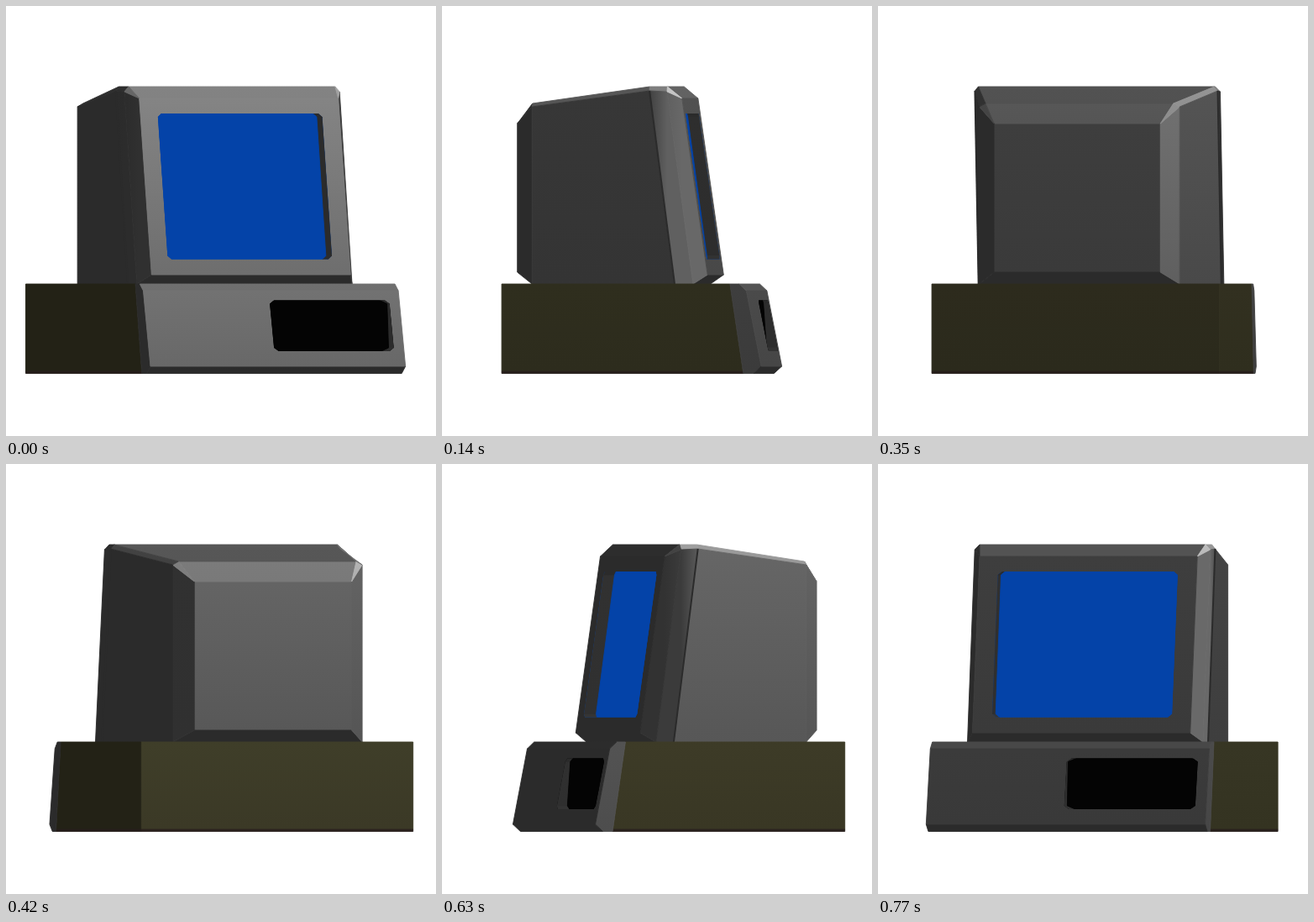
An HTML page with a canvas for the animation above (840 ms loop, 512 px wide and 512 px high).

```html
<!DOCTYPE html>
<html>
<head>
<meta charset="utf-8">
<style>
  html, body { margin: 0; width: 100%; height: 100%; overflow: hidden; background: #fff; }
  canvas { display: block; }
</style>
</head>
<body>
<canvas id="stage" width="512" height="512"></canvas>
<script>
const ctx = document.getElementById('stage').getContext('2d');
const STEP_MS = 70, STEPS = 12, STEP_ANGLE = 0.5;
const AXIS_X = 260.4, AMBIENT = 43, DIFFUSE = 85;
const LIGHT = [0.52, -0.6, 0.6];
const GRAY = [1, 1, 1], OLIVE = [0.81, 0.79, 0.52], RUST = [0.85, 0.68, 0.6];
const SIDES = [-1, 1];
let cos = 1, sin = 0;

// Model space: x right, y down (screen pixels), z out of the front.
const screenX = p => AXIS_X + p[0] * cos + p[2] * sin;
const turn = ([x, y, z]) => [x * cos + z * sin, y, z * cos - x * sin];
const sub = (a, b) => a.map((v, i) => v - b[i]);
const dot = (a, b) => a.reduce((sum, v, i) => sum + v * b[i], 0);
const mix = (a, b) => a.map((v, i) => (v + b[i]) / 2);

function normalOf(pts) {
  const [a, b, c] = sub(pts[1], pts[0]), [d, e, f] = sub(pts[2], pts[0]);
  const n = [b * f - c * e, c * d - a * f, a * e - b * d];
  const len = Math.hypot(...n);
  return n.map(v => v / len);
}

// The lamp hangs above, so surfaces dim towards the floor.
function shade(normal, tint, gain, y) {
  const lit = Math.max(0, dot(turn(normal), LIGHT)) ** 3;
  const level = AMBIENT + DIFFUSE * lit * gain * (1.7 - (y - 96) * 0.0019);
  return `rgb(${tint.map(t => Math.round(level * t))})`;
}

function trace(pts) {
  ctx.beginPath();
  pts.forEach(p => ctx.lineTo(screenX(p), p[1]));
  ctx.closePath();
}

function paint(pts, style) {
  trace(pts);
  ctx.fillStyle = ctx.strokeStyle = style;
  ctx.lineWidth = 0.9;
  ctx.lineJoin = 'round';
  ctx.fill();
  ctx.stroke();
}

// Returns a face painter; outward is 1 for solids and -1 for recesses.
const solid = (center, outward = 1) => (pts, tint = GRAY, gain = 1, bend) => {
  let n = normalOf(pts);
  if (dot(n, sub(pts[0], center)) * outward < 0) n = n.map(v => -v);
  if (turn(n)[2] <= 0.001) return false;
  const ys = pts.map(p => p[1]);
  const top = Math.min(...ys), low = Math.max(...ys), middle = (top + low) / 2;
  let fill;
  if (bend) {
    fill = ctx.createLinearGradient(screenX(pts[0]), 0, screenX(pts[1]) + 0.01, 0);
    bend.forEach((normal, i) => fill.addColorStop(i, shade(normal, tint, gain, middle)));
  } else {
    fill = ctx.createLinearGradient(0, top, 0, low);
    fill.addColorStop(0, shade(n, tint, gain, top));
    fill.addColorStop(1, shade(n, tint, gain, low));
  }
  paint(pts, fill);
  return true;
};

// Quad spanning both sides between two half-profile points.
const across = (a, b) => [[-a[0], a[1], a[2]], a, b, [-b[0], b[1], b[2]]];

function ring(x0, x1, y0, y1, rx, ry, depth) {
  return [
    [x0 + rx, y0], [x1 - rx, y0], [x1, y0 + ry], [x1, y1 - ry],
    [x1 - rx, y1], [x0 + rx, y1], [x0, y1 - ry], [x0, y0 + ry]
  ].map(([x, y]) => [x, y, depth(y)]);
}

// The walls of a recess lie mostly in the shadow of its rim.
function recess(rim, floor, color) {
  const wall = solid(mix(rim[0], rim[4]), -1);
  ctx.save();
  trace(rim);
  ctx.clip();
  paint(rim, color);
  rim.forEach((p, i) => {
    const j = (i + 1) % rim.length;
    wall([p, rim[j], floor[j], floor[i]], GRAY, 0.12);
  });
  paint(floor, color);
  ctx.restore();
}

function drawMonitor() {
  const face = solid([0, 215, -50]);
  face(across([100, 140, -164], [100, 317, -164]));
  face(across([113, 116, -145], [100, 140, -164]), GRAY, 0.65);
  face(across([100, 317, -164], [120.5, 331, -145]));
  face(across([113, 116, -145], [142, 96, -3]), GRAY, 0.9);
  face(across([140, 96, 18], [135, 110, 35]), GRAY, 0.7);
  face(across([135, 320, 65.5], [146, 331, 49]));

  for (const s of SIDES) {
    const at = (x, y, z) => [s * x, y, z];
    const ridge = at(113, 116, -145), backTop = at(120.5, 120, -145), backLow = at(120.5, 331, -145);
    const flatTop = at(100, 140, -164), flatLow = at(100, 317, -164);
    const seamTop = at(146, 101, -3), seamLow = at(146, 331, 27), lip = at(142, 96, -3);
    const rimTop = at(146, 102, 18), rimLow = at(146, 331, 49), crown = at(140, 96, 18);
    const faceTop = at(135, 110, 35), faceLow = at(135, 320, 65.5);
    const flank = at(1, 0, 0), round = at(0.9, 0, 0.44), slope = at(0.8, 0, 0.6);

    face([backTop, backLow, flatLow, flatTop]);
    face([ridge, backTop, flatTop]);
    face([ridge, backTop, seamTop, lip]);
    face([lip, seamTop, rimTop, crown]);
    const sideShown = face([backTop, seamTop, seamLow, backLow], GRAY, 0.95);
    face([seamTop, rimTop, rimLow, seamLow], GRAY, 1, [flank, round]);
    face([rimTop, faceTop, faceLow, rimLow], GRAY, 1, [round, slope]);
    face([crown, rimTop, faceTop], GRAY, 1.1);
    if (sideShown) {
      ctx.beginPath();
      ctx.moveTo(screenX(seamTop), seamTop[1]);
      ctx.lineTo(screenX(seamLow), seamLow[1]);
      ctx.strokeStyle = '#2b2b2b';
      ctx.lineWidth = 2;
      ctx.stroke();
    }
  }

  if (face(across([135, 110, 35], [135, 320, 65.5]))) {
    const rim = ring(-111.5, 111.5, 128, 301.5, 5, 4, y => 35 + (y - 110) * 0.145);
    const glass = ring(-111.5, 111.5, 128, 301.5, 5, 4, y => 24 + (y - 130) * 0.138);
    recess(rim, glass, '#0443a8');
  }
}

function drawBase() {
  const face = solid([0, 385, 0]);
  const half = 173, back = -177.5, sill = 435, foot = 437.5;
  face(across([half, 331, back], [half, sill, back]), OLIVE, 0.8);
  face(across([half, sill, back], [half, foot, back]), RUST, 0.2);

  for (const s of SIDES) {
    const at = (y, z) => [s * half, y, z];
    face([at(331, back), at(331, 95), at(sill, 110.5), at(sill, back)], OLIVE, 0.8);
    face([at(sill, back), at(sill, 110.5), at(foot, 111), at(foot, back)], RUST, 0.2);
    face([at(foot, 111), at(331, 95), at(331, 106), at(339, 114.5), at(429, 132.3), at(foot, 123)]);
  }

  face(across([half, 331, 106], [half, 339, 114.5]), GRAY, 0.7);
  face(across([half, 429, 132.3], [half, foot, 123]));
  if (face(across([half, 339, 114.5], [half, 429, 132.3]))) {
    const rim = ring(-3, 159.5, 350.5, 411, 6, 4, y => 114.5 + (y - 339) * 0.198);
    const slot = ring(-3, 159.5, 350.5, 411, 10, 4, y => 111 + (y - 351) * 0.07);
    recess(rim, slot, '#040404');
  }
}

function draw(now) {
  const step = Math.floor(now / STEP_MS) % STEPS;
  const angle = (step + 1) * STEP_ANGLE;
  cos = Math.cos(angle);
  sin = Math.sin(angle);
  ctx.fillStyle = '#fff';
  ctx.fillRect(0, 0, 512, 512);
  drawMonitor();
  drawBase();
  requestAnimationFrame(draw);
}
requestAnimationFrame(draw);
</script>
</body>
</html>
```
